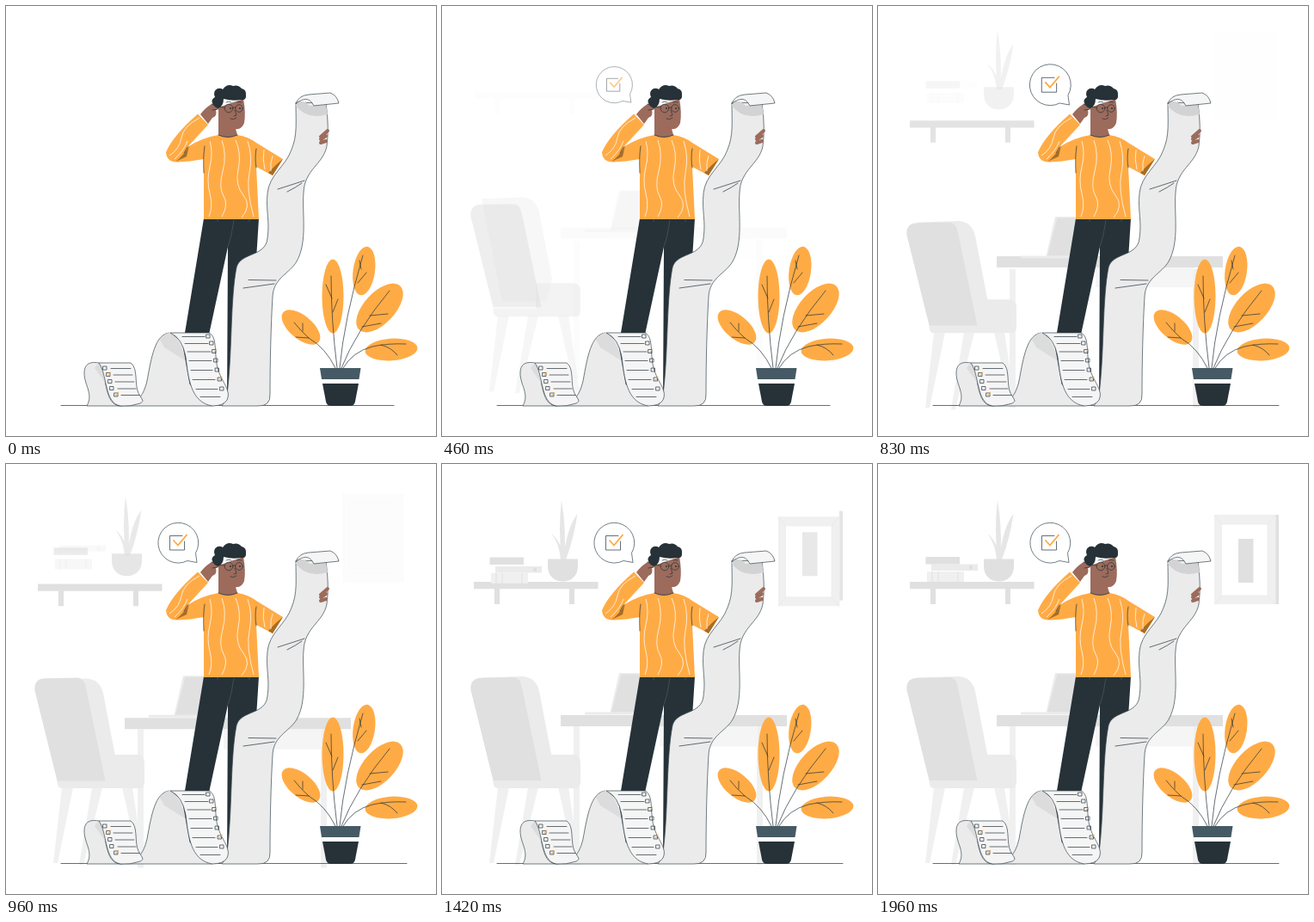
An HTML page for the animation above (2000 ms loop, 500 by 500 pixels).

```html
<!DOCTYPE html>
<html lang="en">
<head>
<meta charset="utf-8">
<title>Checklist</title>
<style>
html, body { margin: 0; width: 100%; height: 100%; overflow: hidden; background: #fff; }
svg { display: block; width: 100%; height: 100%; }
.ink { fill: none; stroke: #263238; stroke-width: .7; stroke-linecap: round; stroke-linejoin: round; }
.paper { stroke: #37474f; stroke-width: .7; stroke-linejoin: round; }
</style>
</head>
<body>
<svg viewBox="0 0 500 500">
  <!-- data-in: start time in ms; data-rise: drop distance -->
  <g id="shelf">
    <path data-in="350" data-rise="40" fill="#e0e0e0" d="M61 145h6v18h-6zM148 145h6v18h-6z"/>
    <path data-in="343" data-rise="40" fill="#e0e0e0" d="M37 137h144.500v8.200H37z"/>
    <path data-in="500" data-rise="30" fill="#e6e6e6" d="M139 111Q135 76 139 42Q145 78 142 111zM141 111Q145 74 157.500 58Q153 88 144 111zM138 111Q136 91 127 81Q139 90 142 111z"/>
    <path data-in="530" data-rise="30" fill="#e0e0e0" d="M123 110.500h35v8c0 12-8 18-17.500 18S123 130.500 123 118.500z"/>
    <g data-in="640" data-rise="30">
      <path fill="#f0f0f0" d="M57 125h43v12H57z"/>
      <path fill="none" stroke="#e0e0e0" d="M63 125v12M70 125v12M93 125v12"/>
    </g>
    <g data-in="740" data-rise="30">
      <path fill="#ebebeb" d="M62 116.500h54v7.500H62z"/>
      <path fill="#e0e0e0" d="M106 118h4v4.500h-4z"/>
    </g>
    <path data-in="590" data-rise="30" fill="#e0e0e0" d="M55.500 108H95v8.500H55.500z"/>
  </g>

  <g id="picture">
    <path data-in="960" data-rise="30" fill="#e0e0e0" d="M462 59h4v104h-4z"/>
    <g data-in="785" data-rise="30">
      <path fill="#f0f0f0" d="M391 59h71.500v104H391z"/>
      <path fill="none" stroke="#e6e6e6" stroke-width=".7" d="M391 59l9 11M462 59l-9 11M391 163l9-10M462 163l-9-10"/>
    </g>
    <path data-in="805" data-rise="30" fill="#fff" stroke="#e8e8e8" stroke-width=".6" d="M399.500 70H453v83h-53.500z"/>
    <path data-in="1010" data-rise="30" fill="#e0e0e0" d="M419 87h17.500v51H419z"/>
  </g>

  <g id="desk">
    <path data-in="265" data-rise="40" fill="#f0f0f0" d="M153 305h7v161h-7zM366 305h7v161h-7z"/>
    <path data-in="310" data-rise="40" fill="#f5f5f5" d="M253 305h114v23.500H253z"/>
    <path data-in="300" data-rise="40" fill="#e0e0e0" d="M138 292h263v13H138z"/>
    <g data-in="232" data-rise="40">
      <path fill="#ebebeb" d="M206 243h32l-8 48h-35z"/>
      <path fill="#e0e0e0" d="M208.500 244.500H238l-8 44h-33z"/>
      <path fill="#ebebeb" d="M166 288.500h62v3h-62z"/>
    </g>
  </g>

  <g id="chair">
    <path data-in="105" data-rise="40" fill="#f0f0f0" d="M65 376h13L60 464h-5zM100 376h12L90 466h-5zM135 376h12l13 88h-5z"/>
    <path data-in="188" data-rise="40" fill="#ebebeb" d="M46 248.500L94 247Q109 248 113 264L128 342L121 368H70z"/>
    <path data-in="105" data-rise="40" fill="#ebebeb" d="M109 338H153Q161 339 161 347V371Q160 377 155 377H65Q59 377 59.500 367H109z"/>
    <path data-in="125" data-rise="40" fill="#e0e0e0" d="M33.500 263Q32 249 46 248.700L84 248Q91 249 93 260L115.500 368H59.500z"/>
  </g>

  <path id="floor" class="ink"/>

  <g id="bubble">
    <path fill="#fff" class="paper" d="M222 114.500L211 112.500A23.400 23.400 0 1 1 220.500 103.500Z"/>
    <path class="ink" d="M205 83.500H190.500V100H207.500V90"/>
    <path fill="none" stroke="#ffa73b" stroke-width="1.700" d="M194.500 88.500L200 94.500L210.500 82"/>
  </g>

  <g id="man">
    <path fill="#263238" d="M230 247H294L290 310L270 462H257L258 280L236 382L216 459H206L208 380z"/>
    <path fill="none" stroke="#516069" stroke-width=".6" d="M265 249L262 266Q260 274 258 280M246 248v3M283 248v3"/>
    <path fill="#ffab45" d="M208 458l8 1l-1 6h-13z"/>
    <path fill="#263238" d="M209 457h7l-1 3h-6z"/>
    <path fill="#9c6b5c" d="M247 118L276 108Q279 124 277 136Q274 144 267 143L270 153Q258 157 247 152z"/>
    <path fill="#d05a4a" opacity=".5" d="M258 140Q265 145 270 142L267 144Q262 145 258 140z"/>
    <path fill="#9c6b5c" d="M226 126Q231 119 239 114L248 115Q250 119 244 121Q246 128 240 130L235 137z"/>
    <path class="ink" d="M239 114l9 3M240 121l6-1"/>
    <path fill="#263238" d="M247 119Q242 118 240 113Q238 109 243 106Q240 99 246 96Q250 95 252 97Q257 90 264 93Q270 91 274 96Q280 97 279 105Q279 110 273 109Q264 111 253 108Q253 116 247 119z"/>
    <g class="ink">
      <circle cx="259" cy="119" r="4.800"/><circle cx="271" cy="119" r="4.300"/>
      <path d="M254 118L246 117M264 118h3M266 121l2 6l-3 1M261 131q4 2 7-1M256 112q3-2 6 0M269 112q3-1 5 0"/>
    </g>
    <g fill="#263238"><circle cx="261" cy="119" r="1"/><circle cx="272" cy="119" r="1"/></g>
    <path fill="#ffab45" d="M247 150Q258 156 269 150Q282 152 291 159L322 178L310 197L291 187L294 248H230L230 178Q213 181 200 181.500Q187 182 186 170Q194 151 223 125.500L235 138L211 164Q228 153 247 150z"/>
    <path fill="#a66d26" d="M213 162L210 175L197 181Q208 173 213 162zM322 178L310 197L305 194Q314 184 322 178z"/>
    <path class="ink" d="M231 163Q229 175 230 194M291 166Q289 176 291 188M211 164L207 171M247 150Q258 155 269 150"/>
    <g fill="none" stroke="#fff" stroke-opacity=".75" stroke-width="1">
      <path d="M237 157Q241 171 237 187T237 218T236 245M251 156Q257 173 252 192T253 221T251 245M267 156Q274 172 270 190T276 220T274 246M281 157Q287 175 283 194T288 245"/>
      <path d="M190 174Q202 166 204 153T225 130M196 178Q207 168 211 157M300 167Q298 179 301 190M310 174Q307 182 308 192"/>
    </g>
  </g>

  <g id="scroll">
    <path fill="#ebebeb" class="paper" d="M91 427C91 413 102 414 108 415C118 427 113 464 133 465C152 465 160 453 164 436C169 409 173 382 190 380L205 390L214 440L240 465H94C102 451 91 441 91 427z"/>
    <path fill="#dcdcdc" d="M108 415Q115 426 116 439L103 421zM179 388Q186 379 191 380Q204 388 208 412L184 397z"/>
    <path fill="#ebebeb" class="paper" d="M337 112C337 135 339 150 332 167C325 187 306 196 304 218C302 239 307 250 304 270C302 292 273 286 268 304C261 340 263 397 258 443Q257 458 251 465H292Q308 466 307 451C307 415 308 371 310 338C311 316 330 311 338 297C351 274 344 240 346 217C347 190 369 184 373 163Q376 141 372 113z"/>
    <path fill="#d3d3d3" d="M337 113Q346 108 353 116L372 115L374 126Q350 133 337 116z"/>
    <path fill="#f5f5f5" class="paper" d="M337 114Q340 104 352 103L377 101Q385 104 387 113L358 116Q353 106 345 109Q339 111 337 114z"/>
    <path class="ink" d="M316 213L347 203M327 216Q337 211 344 206M282 318.500L314 319M276 328L312 323"/>
    <path fill="none" stroke="#9c6b5c" stroke-width="4" stroke-linecap="round" d="M366 152L374 145M366 155L372 151M366 159L372 157"/>
    <path fill="#f5f5f5" class="paper" d="M108 415H145C154 421 149 440 154 450C159 459 161 459 156 462Q145 466 133 465C114 462 118 428 108 415z"/>
    <path fill="#f5f5f5" class="paper" d="M191 380H236C247 385 241 407 247 424C252 439 262 447 257 458Q253 465 240 465C214 461 212 431 209 408Q205 386 191 380z"/>
    <g id="list"></g>
  </g>

  <g id="plant">
    <g fill="#ffab45">
      <ellipse cx="380" cy="337.500" rx="12.500" ry="43"/>
      <ellipse cx="416.300" cy="308" rx="12.700" ry="28.500" transform="rotate(8 416 308)"/>
      <ellipse cx="434.500" cy="351" rx="18" ry="35" transform="rotate(43 434.500 351)"/>
      <ellipse cx="448" cy="399.500" rx="30.500" ry="12.800" transform="rotate(-4 448 399)"/>
      <ellipse cx="343" cy="373.500" rx="27" ry="13.500" transform="rotate(40 343 373.500)"/>
    </g>
    <path class="ink" d="M385 421Q378 365 378 314M380 356l6-15M379 340l-7-16M388 421Q393 365 415 290M409 322l10-12M413 306l-2-10M390 421Q407 378 446 331M414 373l22-4M423 360l21-2M392 421Q403 402 426 396Q444 392 465 393M436 394q12 3 19 12M383 421Q372 398 352 386Q343 378 335 368M352 386l-15-1M345 378v-9"/>
    <path fill="#455a64" d="M365 421h47.500l-2 13H367z"/>
    <path fill="#fff" d="M367 434h43v5h-43z"/>
    <path fill="#263238" d="M368 439h42l-4 21q-1 5-6 5h-22q-5 0-6-5z"/>
  </g>
</svg>
<script>
const LOOP = 2000, DURATION = 850;
const $ = id => document.getElementById(id);

// Checkbox rows: box x, box y, line start, line end
const rows = [
  [115, 421, 122, 145], [119, 428.500, 125, 147], [121, 436.500, 127, 149],
  [123, 444.500, 130, 151], [128, 452, 134, 155],
  [235, 384, 205, 231], [239, 392, 208, 235], [242, 401.500, 211, 238],
  [244, 412, 213, 239], [245.500, 423, 215, 240], [248.500, 434, 217, 243], [251, 445, 221, 246], [248, 454, 226, 249]
];
$('list').innerHTML = rows.map(([x, y, from, to], i) =>
  (i < 12 ? `<path class="ink" d="M${x - 2} ${y - 2}h4v4h-4z"/>` : '') +
  (i % 3 === 1 ? `<path fill="none" stroke="#ffab45" d="M${x - 1} ${y}l1 1l3-4"/>` : '') +
  `<path class="ink" d="M${from} ${y + .5}H${to}"/>`).join('');

const cubic = (s, a, b) => 3 * (1 - s) ** 2 * s * a + 3 * (1 - s) * s * s * b + s ** 3;

// Ease with a small overshoot: cubic-bezier(.36, 0, .5, 1.45)
function ease(x) {
  if (x <= 0) return 0;
  if (x >= 1) return 1;
  let low = 0, high = 1;
  for (let i = 0; i < 22; i++) {
    const mid = (low + high) / 2;
    if (cubic(mid, .36, .5) < x) low = mid; else high = mid;
  }
  return cubic(low, 0, 1.45);
}

const parts = [...document.querySelectorAll('[data-in]')].map(el =>
  ({ el, start: +el.dataset.in, rise: +el.dataset.rise }));

function draw(t) {
  for (const { el, start, rise } of parts) {
    const p = ease((t - start) / DURATION);
    el.setAttribute('opacity', Math.min(1, p));
    el.setAttribute('transform', `translate(0 ${rise * (p - 1)})`);
  }
  const p = ease((t - 80) / DURATION);
  $('bubble').setAttribute('opacity', Math.min(1, p));
  $('bubble').setAttribute('transform', `translate(200.500 91.500) scale(${.7 + .3 * p}) translate(-200.500 -91.500)`);
  $('floor').setAttribute('d', `M64 464.500H${t < 700 ? 451 : 466}`);
}

function frame() {
  draw(performance.now() % LOOP);
  requestAnimationFrame(frame);
}
frame();
</script>
</body>
</html>
```
